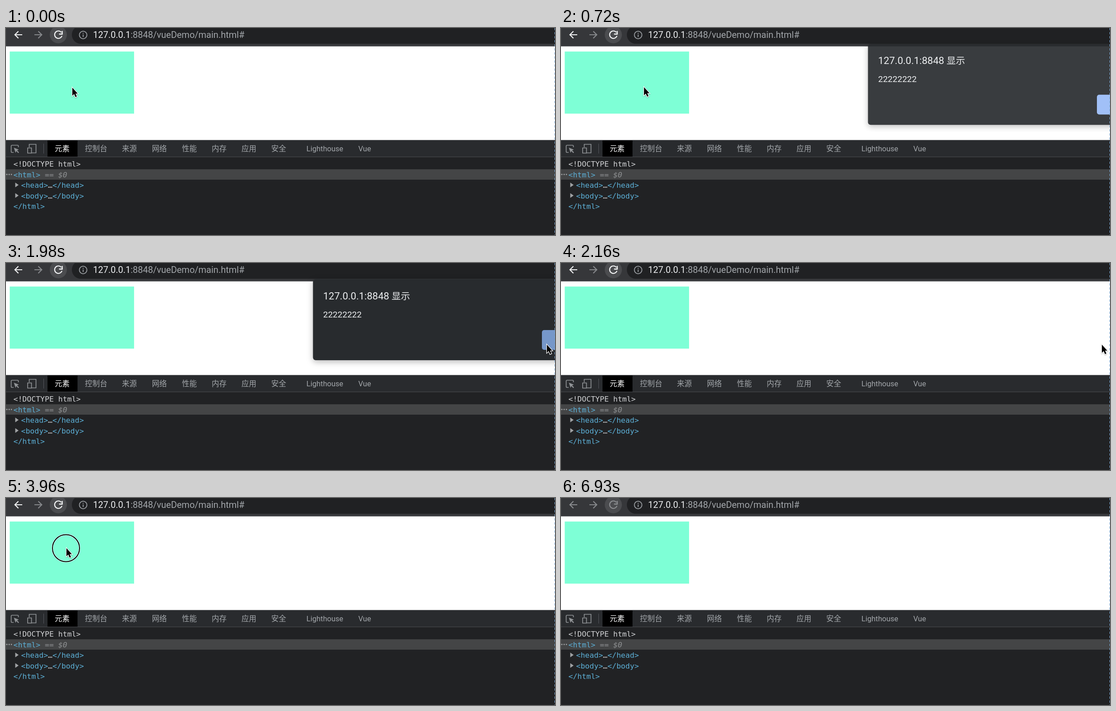
Recreate the animation shown at these times as an HTML page. Size 1217 px wide and 460 px high, loop 7020 ms.

```html
<!DOCTYPE html>
<html lang="zh-CN">
<head>
<meta charset="utf-8">
<style>
html, body { margin: 0; width: 100%; height: 100%; overflow: hidden; background: #212224 }
svg { display: block }
text { font-family: Roboto, "Noto Sans CJK SC", "Noto Sans CJK", sans-serif; fill: #a2a6aa }
.tabs text { font-size: 16.5px }
.code text { font: 16.5px "DejaVu Sans Mono", monospace; fill: #5db0d7 }
.code .plain { fill: #d2d3d5 }
.code .dim { fill: #8f9193 }
.icon { fill: none; stroke: #919497; stroke-width: 1.7 }
#dialog { filter: drop-shadow(0 4px 7px rgba(0,0,0,.27)) }
#dialog text { fill: #eceef0 }
#cursor { filter: drop-shadow(0 1.5px 1px rgba(0,0,0,.3)) }
</style>
</head>
<body>
<svg width="1217" height="460" viewBox="0 0 1217 460">
  <!-- browser toolbar -->
  <rect width="1217" height="41" fill="#36373a"/>
  <rect y="39.5" width="1217" height="1.5" fill="#55565a"/>
  <rect x="146" y="-5" width="1100" height="40" rx="20" fill="#202123"/>
  <circle cx="116" cy="15" r="19" fill="#4b4c4f"/>
  <g fill="none" stroke-width="2.2">
    <g id="nav">
      <path d="M36 15H20M27.5 7.2L19.7 15L27.5 22.8"/>
      <path d="M122.6 9.6A8.3 8.3 0 1 0 124 17.5"/>
      <path d="M124.6 6.5V13.5H117.6" stroke-width="2.4"/>
    </g>
    <path d="M63 15H79M71.5 7.2L79.3 15L71.5 22.8" stroke="#87898c"/>
    <g stroke="#9ca0a4" stroke-width="1.8"><circle cx="171" cy="15.5" r="8.4"/><path d="M171 14.5V20M171 10.8V12.8"/></g>
  </g>
  <text x="193" y="22" font-size="20"><tspan fill="#eceef0">127.0.0.1</tspan>:8848/vueDemo/main.html#</text>

  <!-- page -->
  <rect y="41" width="1217" height="208" fill="#fff"/>
  <rect x="8.3" y="52.3" width="275.6" height="138" fill="#7effd6"/>

  <!-- developer tools -->
  <rect y="249" width="1217" height="38" fill="#292b2e"/>
  <path d="M0 249.3H1217M0 286.5H1217" stroke="#4a4c50"/>
  <rect x="92" y="250" width="66.5" height="36" fill="#000"/>
  <g class="icon">
    <path d="M17 276.5H13.5Q11.5 276.5 11.5 274.5V262.5Q11.5 260.5 13.5 260.5H25.5Q27.5 260.5 27.5 262.5V265"/>
    <path d="M17.5 266L28.5 270.2L24.5 272L28.8 276.3L27.2 277.9L22.9 273.6L21.2 277.5Z" fill="#919497" stroke="none"/>
    <path d="M51.5 265V258.5H66.5V277.5H57M48 266.5H56.5V278H48Z"/>
    <path d="M83.5 257V279" stroke="#55585c" stroke-width="1"/>
  </g>
  <g class="tabs" id="tabs"></g>
  <rect y="314" width="1217" height="23" fill="#444546"/>
  <g class="code">
    <text x="16.5" y="308" class="plain">&lt;!DOCTYPE html&gt;</text>
    <text x="16.5" y="331.5">&lt;html&gt;<tspan class="dim"> == <tspan font-style="italic">$0</tspan></tspan></text>
    <text x="33.5" y="355">&lt;head&gt;<tspan class="plain">…</tspan>&lt;/head&gt;</text>
    <text x="33.5" y="378.5">&lt;body&gt;<tspan class="plain">…</tspan>&lt;/body&gt;</text>
    <text x="16.5" y="402">&lt;/html&gt;</text>
  </g>
  <path d="M20.5 343.5V354L28 348.7ZM20.5 367V377.5L28 372.2Z" fill="#a0a2a4"/>
  <path d="M2 325.5H15" stroke="#a0a2a4" stroke-width="2.8" stroke-linecap="round" stroke-dasharray="0 5"/>

  <!-- alert -->
  <g id="dialog">
    <rect x="680.5" y="36" width="640" height="180" rx="6" fill="#282b2e"/>
    <text x="703" y="80.5" font-size="22">127.0.0.1:8848 <tspan font-size="20.5">显示</tspan></text>
    <text x="703" y="120.5" font-size="19">22222222</text>
    <rect id="ok" x="1188" y="149" width="120" height="44" rx="5"/>
  </g>
  <path d="M1216.5 0V460" stroke="#79a7d3" stroke-dasharray="5 4"/>

  <g id="pointer">
    <g id="ring" fill="none"><circle cy="1.5" r="30" stroke="#fff" stroke-opacity=".6" stroke-width="4"/><circle cy="1.5" r="30" stroke="#000" stroke-width="2"/></g>
    <path id="cursor" d="M1 1.5V19.5L5 15.8L8 22.6L11 21.3L8.1 14.7H13Z" stroke="#fff" stroke-width="2.4" paint-order="stroke"/>
  </g>
</svg>
<script>
const LOOP = 7020, STEP = 90;
const $ = id => document.getElementById(id);
const clamp = v => Math.max(0, Math.min(1, v));
const ease = v => v * v * (3 - 2 * v);

const tabs = [["元素", 108], ["控制台", 175], ["来源", 257], ["网络", 323.5], ["性能", 390], ["内存", 456],
  ["应用", 522], ["安全", 588], ["Lighthouse", 666], ["Vue", 781]];
$("tabs").innerHTML = tabs.map(([name, x], i) =>
  `<text x="${x}" y="273.8" ${i ? "" : 'style="fill:#fff"'}>${name}</text>`).join("");

// time, x, y of the pointer tip
const route = [[0, 146, 131], [450, 146, 131], [720, 183, 130], [1530, 1198, 180], [2220, 1198, 180],
  [3060, 150, 112], [3240, 133, 110], [4770, 133, 110], [5130, 284, 112], [5490, 490, 100]];
// press start and end
const presses = [[180, 300], [1750, 1900], [3300, 3450], [3600, 3750], [3930, 4080], [4230, 4380], [4500, 4650]];

function pointerAt(t) {
  const i = Math.max(1, route.findIndex(p => p[0] >= t));
  const [t0, x0, y0] = route[i - 1], [t1, x1, y1] = route[i];
  const k = ease((t - t0) / (t1 - t0));
  return [x0 + (x1 - x0) * k, y0 + (y1 - y0) * k];
}

function draw(t) {
  const moving = t < 5490;
  $("pointer").style.display = moving ? "" : "none";
  if (moving) $("pointer").setAttribute("transform", `translate(${pointerAt(t)})`);
  $("ring").style.display = presses.some(([a, b]) => t >= a && t < b) ? "" : "none";

  const shown = clamp((t - 550) / 185) * clamp((2140 - t) / 150);
  $("dialog").style.opacity = shown;
  $("dialog").setAttribute("transform", `translate(0 ${-10 * (1 - shown)})`);
  $("ok").setAttribute("fill", t >= 1750 ? "#7697c9" : "#99bbf7");
  $("nav").setAttribute("stroke", t < 6300 ? "#f4f5f6" : "#8b8d90");
}

function frame(now) {
  draw(Math.floor(now % LOOP / STEP) * STEP);
  requestAnimationFrame(frame);
}
frame(performance.now());
</script>
</body>
</html>
```
